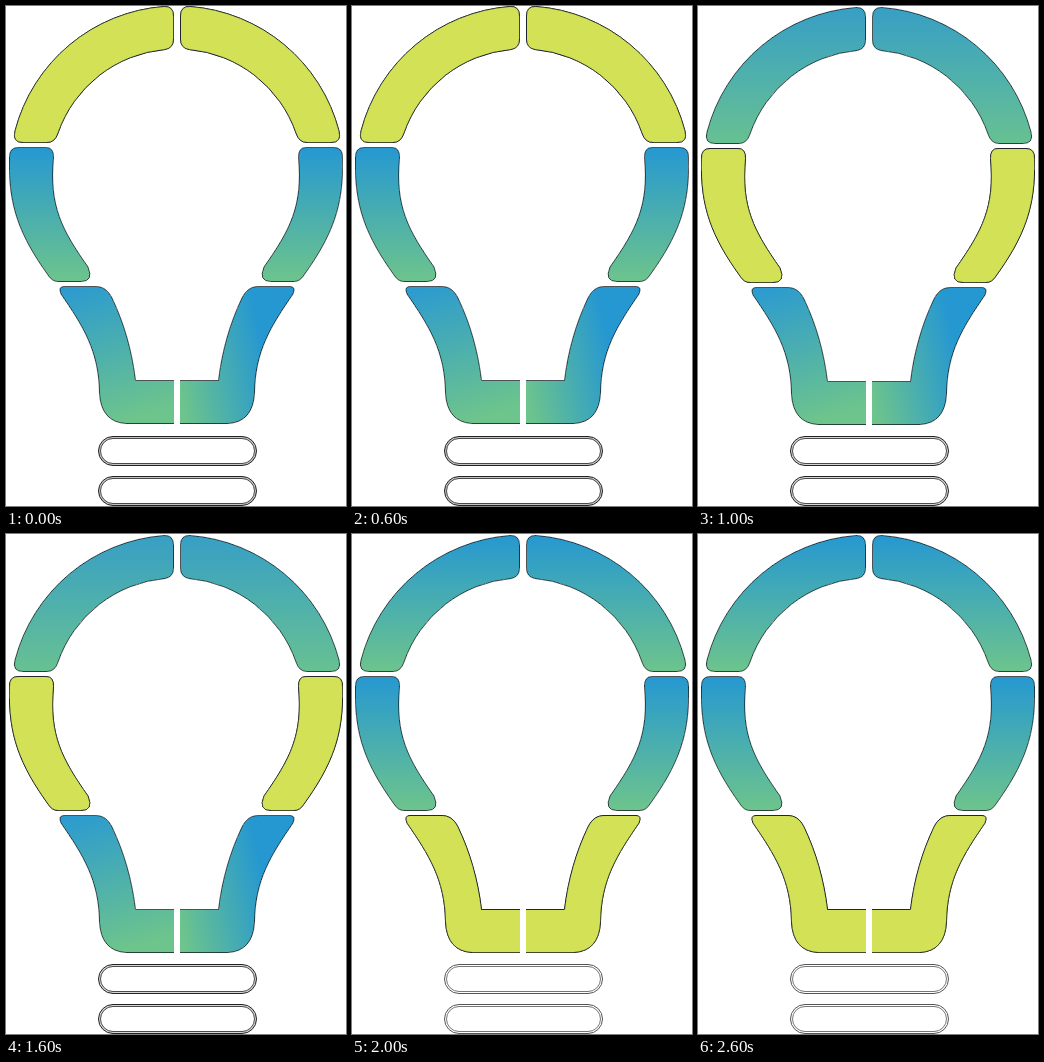
These frames come from a looping animation (340x500 px, 3000 ms). An HTML page:

```html
<!DOCTYPE html>
<html lang="en">
<head>
<meta charset="utf-8">
<title>Light bulb</title>
<style>
  html, body { margin: 0; width: 100%; height: 100%; overflow: hidden; background: #fff; }
  svg { display: block; width: 340px; height: 500px; }
  path { stroke: #10191c; stroke-width: .75; stroke-linejoin: round; shape-rendering: crispEdges; }

  .lit { fill: #d3e156; visibility: hidden; animation: lit 3s step-end infinite; }
  .top.lit { animation-delay: -3s; }
  .mid.lit { animation-delay: -2s; }
  .low.lit { animation-delay: -1s; }
  @keyframes lit {
    0% { visibility: visible; }
    33.3333%, 100% { visibility: hidden; }
  }

  .bulb { animation: settle 3s step-end infinite; }
  @keyframes settle {
    0% { transform: translateY(0); }
    33.3333%, 100% { transform: translateY(1px); }
  }

  .sky { stop-color: #2698d1; animation: sky 3s step-end infinite; }
  .sea { stop-color: #6dc48c; animation: sea 3s step-end infinite; }
  @keyframes sky { 33.3333% { stop-color: #379fc5; } 66.6667%, 100% { stop-color: #2698d1; } }
  @keyframes sea { 33.3333% { stop-color: #67c192; } 66.6667%, 100% { stop-color: #6dc48c; } }

  .ring { stroke: #222; animation: ring 3s step-end infinite; }
  .hole { fill: #fff; stroke-width: .8; }
  @keyframes ring {
    0% { fill: #c4c4c6; stroke: #222; }
    33.3333% { fill: #d6d6d6; stroke: #222; }
    66.6667%, 100% { fill: #fff; stroke: #555; }
  }
</style>
</head>
<body>
<svg viewBox="0 0 340 500">
  <defs>
    <linearGradient id="crown" x2="0" y2="1">
      <stop class="sky"/>
      <stop class="sea" offset="1"/>
    </linearGradient>
    <linearGradient id="down" x2="0" y2="1">
      <stop stop-color="#2698d1"/>
      <stop offset="1" stop-color="#6dc48c"/>
    </linearGradient>
    <linearGradient id="slant" gradientUnits="userSpaceOnUse" x1="80" y1="278" x2="118" y2="414">
      <stop stop-color="#2c9bcf"/>
      <stop offset="1" stop-color="#6dc48c"/>
    </linearGradient>
    <linearGradient id="side" gradientUnits="userSpaceOnUse" x1="168" y1="392" x2="78" y2="372">
      <stop stop-color="#6dc48c"/>
      <stop offset="1" stop-color="#2698d1"/>
    </linearGradient>

    <path id="top" d="M158 .5Q167.500 0 167.500 10V33Q167.500 42 159 43.500A125 125 0 0 0 52 127Q49 136.500 41 136.500H17Q6 136.500 9 125A167 167 0 0 1 158 .5Z"/>
    <path id="mid" d="M12 141.500H40Q48 141.500 47.500 152C43 200 56 224 82 261Q88 275.500 75 275.500H52Q46 275.500 42 269C14 230 2 200 3.500 152Q3 141.500 12 141.500Z"/>
    <path id="low" d="M168 417.500H120Q95 416 93.500 387C93 345 77 320 55 288Q52 280.500 58 280.500H89C97 280.500 102 284 106 292C118 317 126 345 129.500 374.500H168"/>
  </defs>

  <rect width="340" height="500" fill="#fff"/>
  <g class="bulb">
    <use href="#top" fill="url(#crown)"/>
    <use href="#top" class="top lit"/>
    <use href="#mid" fill="url(#down)"/>
    <use href="#mid" class="mid lit"/>
    <use href="#low" fill="url(#slant)"/>
    <use href="#low" class="low lit"/>

    <g transform="matrix(-1 0 0 1 342 0)">
      <use href="#top" fill="url(#crown)"/>
      <use href="#top" class="top lit"/>
      <use href="#low" fill="url(#side)"/>
      <use href="#low" class="low lit"/>
    </g>
    <g transform="matrix(-1 0 0 1 340 0)">
      <use href="#mid" fill="url(#down)"/>
      <use href="#mid" class="mid lit"/>
    </g>
  </g>

  <g class="ring">
    <rect x="92.500" y="430.500" width="158" height="29" rx="14.500"/>
    <rect class="hole" x="94.500" y="432.500" width="154" height="25" rx="12.500"/>
    <rect x="92.500" y="470.500" width="158" height="29" rx="14.500"/>
    <rect class="hole" x="94.500" y="472.500" width="154" height="25" rx="12.500"/>
  </g>
</svg>
</body>
</html>
```
